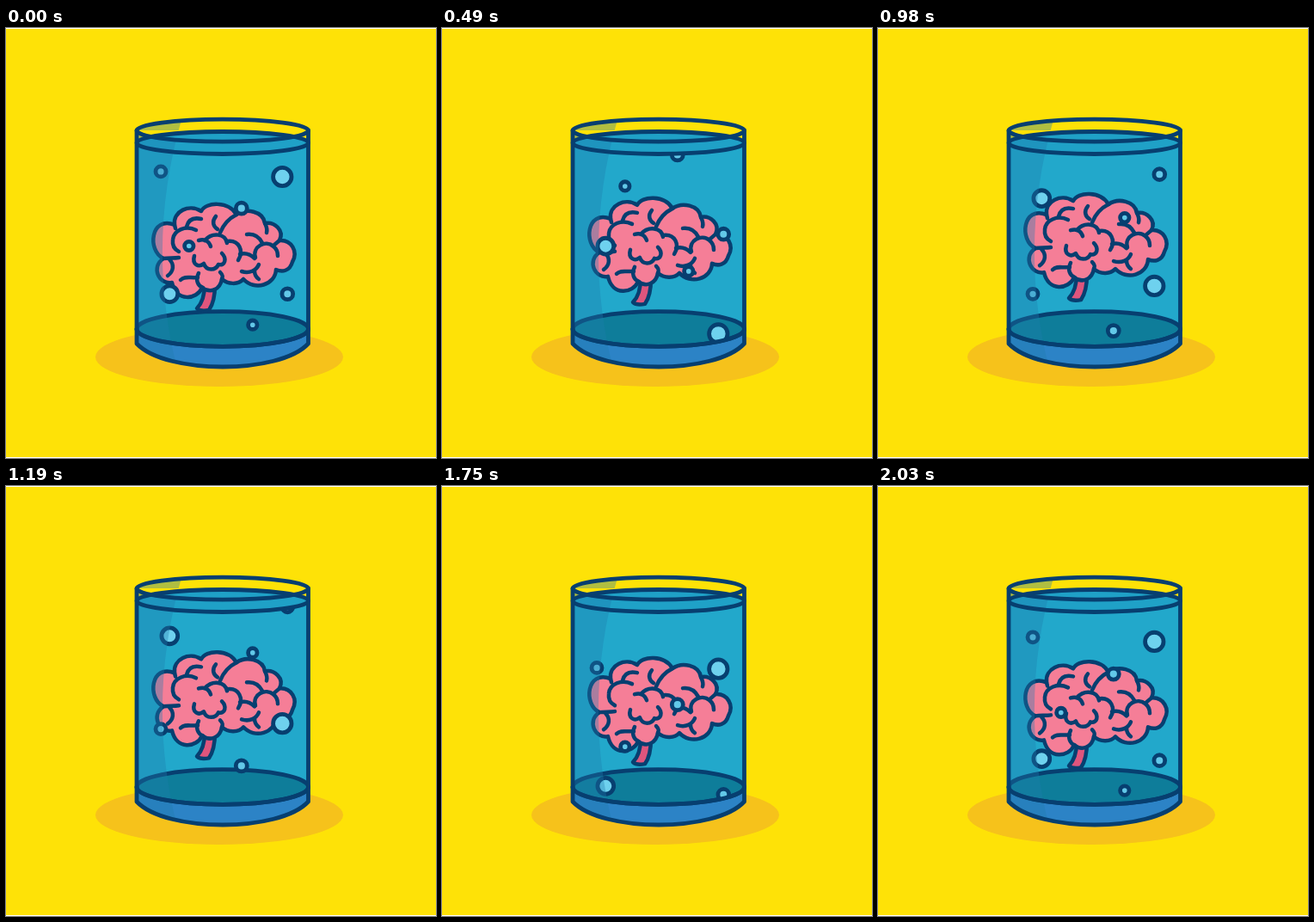
An HTML page with a canvas that plays this animation: 500x500 px, repeating every 2100 ms.

```html
<!DOCTYPE html>
<html lang="en">
<head>
<meta charset="utf-8">
<title>Brain in a jar</title>
<style>
html, body { margin: 0; width: 100%; height: 100%; overflow: hidden; background: #fff; }
canvas { display: block; width: 500px; height: 500px; }
</style>
</head>
<body>
<canvas id="stage" width="500" height="500"></canvas>
<script>
const ctx = document.getElementById('stage').getContext('2d');
const LOOP = 2100, STEP = 70;
const NAVY = '#073f70';
const LEFT = 152, RIGHT = 351.5, CX = 251.75, RX = 99.75;

// Each bubble: x, radius, height at the loop start, travel per loop
const bubbles = [
  { x: 321.3, r: 10.7, y: 173, span: 238 },
  { x: 190.3, r: 9.4, y: 309.2, span: 238 },
  { x: 180, r: 6, y: 166.9, span: 267 },
  { x: 273.8, r: 6.5, y: 209.7, span: 267 },
  { x: 286.8, r: 5.2, y: 345.2, span: 267 },
  { x: 212.8, r: 5.2, y: 253.5, span: 298 },
  { x: 327.3, r: 6.4, y: 309.2, span: 298 }
];

const brain = new Path2D(`M196 229 C194 213 213 204 227 213
  C232 202 259 201 268 217 C279 209 299 213 301 227
  C312 225 324 235 318 247 C332 246 340 260 333 272
  C330 283 321 284 314 281 C313 299 289 306 276 292
  C270 299 258 298 251 292 C249 304 238 309 228 302
  C222 316 198 319 193 296 C178 299 168 278 183 268
  C164 259 168 218 196 229Z`);

const stem = new Path2D(`M231 298 C231 314 226 322 222 326
  C225 329 231 329 236 328 C241 321 243 310 243 298Z`);

const folds = [
  'M196 229 L197 233 M221 235 C209 229 195 235 194 246 C193 254 197 258 201 260',
  'M183 268 C189 267 195 268 201 267 M190 269 C196 275 195 283 188 288',
  'M210 231 C212 223 218 220 227 222',
  'M244 219 C239 225 241 231 246 234',
  'M268 217 C260 221 253 228 249 238',
  'M224 247 C231 245 236 248 238 254 M231 247 C240 237 255 239 257 250',
  'M257 248 C271 246 277 259 270 270',
  'M219 265 C216 275 224 279 230 274 C233 283 244 282 247 275 C255 277 257 268 251 262',
  'M203 293 C208 288 214 291 223 290',
  'M224 285 C220 293 223 300 229 302 M251 292 C253 288 251 286 249 284',
  'M280 240 C289 239 295 244 298 250',
  'M290 267 C286 254 302 246 311 254 C315 257 316 261 316 265',
  'M272 263 C279 261 284 263 289 268',
  'M274 283 C283 286 291 282 294 275 M289 282 C289 287 291 290 294 292',
  'M301 227 C303 231 304 235 303 238 M318 247 L311 253'
].map(d => new Path2D(d));

const shine = new Path2D('M206 100 Q161 250 200 400 L140 400 L140 100Z');

function oval(cy, ry, end = Math.PI * 2) {
  const p = new Path2D();
  p.ellipse(CX, cy, RX, ry, 0, 0, end);
  return p;
}

const rim = oval(119.2, 13);
const surface = oval(133.5, 13);
const ground = oval(350, 20.3);
const groundFront = oval(350, 20.3, Math.PI);

// Jar outline from a given height down, with its bowed bottom edge
const shell = top =>
  `M${LEFT} ${top} V367 C186 403 318 403 ${RIGHT} 367 V${top}`;
const sides = new Path2D(shell(119));
const base = new Path2D(shell(350));

const water = new Path2D();
water.ellipse(CX, 133.5, RX, 13, 0, Math.PI, 0, true);
water.ellipse(CX, 350, RX, 20.3, 0, 0, Math.PI);
water.closePath();

const glass = new Path2D(rim);
glass.addPath(sides);

function fill(path, color) {
  ctx.fillStyle = color;
  ctx.fill(path);
}

function line(path, width = 4.8) {
  ctx.strokeStyle = NAVY;
  ctx.lineWidth = width;
  ctx.stroke(path);
}

function within(path, paint) {
  ctx.save();
  ctx.clip(path);
  paint();
  ctx.restore();
}

function drawBrain(u) {
  ctx.save();
  ctx.translate(0, -12 * Math.pow(Math.sin(Math.PI * u), 1.3));
  fill(stem, '#df557d');
  line(stem, 4.5);
  fill(brain, '#f57e97');
  [brain, ...folds].forEach(p => line(p, 4.5));
  ctx.restore();
}

function drawBubbles(u) {
  for (const b of bubbles) {
    const top = 138 - b.r;
    const gone = b.y - b.span * u - top;
    const y = top + (gone + b.span) % b.span;
    const disc = new Path2D();
    disc.arc(b.x, y, b.r, 0, Math.PI * 2);
    fill(disc, b.r > 9 ? '#6ed1ee' : '#62c8e8');
    line(disc);
  }
}

function draw(u) {
  ctx.fillStyle = '#fff';
  ctx.fillRect(0, 0, 500, 500);
  ctx.fillStyle = '#fee207';
  ctx.fillRect(0, 1, 500, 498);
  const shadow = new Path2D();
  shadow.ellipse(248, 382.5, 144, 34.5, 0, 0, Math.PI * 2);
  fill(shadow, '#f6c21b');

  fill(base, '#2c83c6');
  fill(water, '#22a8cb');
  fill(surface, '#1fa1c7');
  fill(ground, '#0e7d9a');
  line(ground);
  drawBrain(u);
  within(water, () => drawBubbles(u));
  within(glass, () => fill(shine, 'rgba(31,124,172,0.35)'));
  [groundFront, surface, rim, sides].forEach(p => line(p));
}

ctx.lineCap = ctx.lineJoin = 'round';

function tick() {
  const t = performance.now() % LOOP;
  draw(Math.floor(t / STEP) * STEP / LOOP);
  requestAnimationFrame(tick);
}
tick();
</script>
</body>
</html>
```
